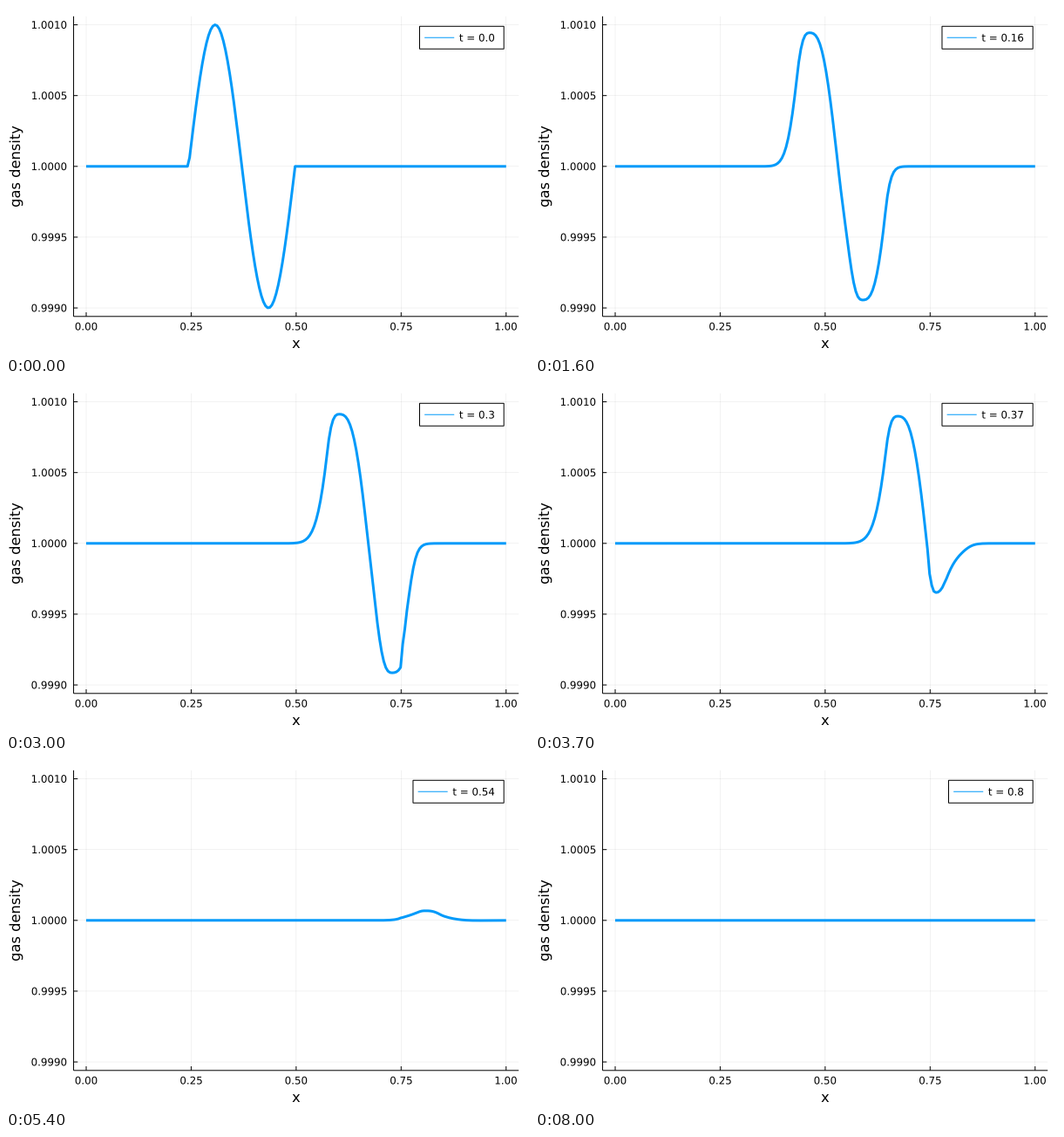
A matplotlib script for the animation above (8.1 s loop, 600 by 400 pixels).

```python
import numpy as np
import matplotlib.pyplot as plt
from matplotlib.animation import FuncAnimation
from matplotlib.patches import PathPatch, Rectangle
from matplotlib.textpath import TextPath
from matplotlib.transforms import Affine2D

W, H, DPI = 600, 400, 100
FRAMES, INTERVAL = 81, 100
BLUE = "#009AFA"
SMALL, LARGE = 11.85, 16.29
LEFT, RIGHT, TOP, BOTTOM = 77.55, 588.19, 11.81, 355.8
CELLS, DX, SPEED, SUBSTEPS = 200, 1 / 202, 0.985, 4
DT = 0.01 / SUBSTEPS
CFL = SPEED * DT / DX
DAMPING = 34

plt.rcParams["font.family"] = "DejaVu Sans"


def px(x):
    return LEFT + (RIGHT - LEFT) * (x + 0.03) / 1.06


def py(delta):
    """Pixel row of a density deviation given in thousandths."""
    return (TOP + BOTTOM) / 2 - (BOTTOM - TOP) * delta / 2.12


def minmod(a, b):
    return np.where(a * b > 0, np.sign(a) * np.minimum(abs(a), abs(b)), 0.0)


def advect(u):
    """Upwind flux difference with limited linear reconstruction."""
    v = np.concatenate(([0, 0], u, [u[-1]]))
    d = np.diff(v)
    face = v[1:-1] + 0.5 * minmod(d[:-1], d[1:])
    return -CFL * np.diff(face)


def simulate():
    x = DX * (np.arange(CELLS) + 2)
    u = np.where((x > 0.25) & (x < 0.5), np.sin(8 * np.pi * (x - 0.25)), 0.0)
    # absorbing layer on the right
    decay = np.where(x > 0.75, np.exp(-DAMPING * SPEED * DT), 1.0)
    states = [u]
    for _ in range(FRAMES - 1):
        for _ in range(SUBSTEPS):
            first = u + advect(u)
            u = 0.5 * (u + first + advect(first)) * decay
        states.append(u)
    return states


def stroke(xs, ys, color="black", width=1.0, **kw):
    return ax.plot(xs, ys, color=color, lw=width * 72 / DPI, snap=False,
                   solid_capstyle="butt", **kw)[0]


def text_path(x, y, text, size=SMALL, align="left", angle=0):
    """Glyph outlines with the baseline through (x, y)."""
    path = TextPath((0, 0), text, size=size)
    ink = path.get_extents()
    anchor = {"left": 0, "center": (ink.x0 + ink.x1) / 2, "right": ink.x1}
    place = Affine2D().translate(-anchor[align], 0).scale(1, -1)
    return path.transformed(place.rotate_deg(-angle).translate(x, y))


def label(*args, **kw):
    patch = PathPatch(text_path(*args, **kw), fc="black", lw=0, zorder=5)
    return ax.add_patch(patch)


fig = plt.figure(figsize=(W / DPI, H / DPI), dpi=DPI, facecolor="white")
ax = fig.add_axes([0, 0, 1, 1])
ax.set_xlim(0, W)
ax.set_ylim(H, 0)
ax.axis("off")

grid = dict(width=0.5, alpha=0.1, zorder=1)
TICK = 4.72
for value in (0, 0.25, 0.5, 0.75, 1):
    x = px(value)
    stroke([x, x], [TOP, BOTTOM], **grid)
    stroke([x, x], [BOTTOM, BOTTOM - TICK], zorder=2)
    label(x, 371.5, f"{value:.2f}", align="center")

for delta in (-1, -0.5, 0, 0.5, 1):
    y = py(delta)
    stroke([LEFT, RIGHT], [y, y], **grid)
    stroke([LEFT, LEFT + TICK], [y, y], zorder=2)
    label(69.3, y + 4.32, f"{1 + delta / 1000:.4f}", align="right")

stroke([LEFT, LEFT], [TOP, BOTTOM], zorder=2)
stroke([LEFT, RIGHT], [BOTTOM, BOTTOM], zorder=2)
label((LEFT + RIGHT) / 2, 392, "x", LARGE, "center")
label(16, (TOP + BOTTOM) / 2, "gas density", LARGE, "center", 90)

states = simulate()
wave = stroke(px(np.linspace(0, 1, CELLS)), py(states[0]), BLUE, 3, zorder=3)

BOX_RIGHT, BOX_TOP, BOX_HEIGHT = 571.17, 23.28, 25.92
ROW = BOX_TOP + BOX_HEIGHT / 2
PAD, SAMPLE = (RIGHT - LEFT) / 90, (RIGHT - LEFT) / 15
box = Rectangle((0, BOX_TOP), 1, BOX_HEIGHT, fc="white", ec="black",
                lw=72 / DPI, snap=False, zorder=4)
ax.add_patch(box)
sample = stroke([0, 0], [ROW, ROW], BLUE, zorder=5)
legend = label(0, 0, "t")


def update(i):
    wave.set_ydata(py(states[i]))
    text = f"t = {round(i * 0.01, 2)}"
    left = 474.5 - 0.636 * SMALL * (len(text) - 7)
    start = left + PAD
    box.set_x(left)
    box.set_width(BOX_RIGHT - left)
    sample.set_xdata([start, start + SAMPLE])
    legend.set_path(text_path(start + SAMPLE + PAD, ROW + 4.32, text))
    return wave, box, sample, legend


anim = FuncAnimation(fig, update, frames=FRAMES, interval=INTERVAL,
                     repeat=True, repeat_delay=0, blit=False)
plt.show()
```
